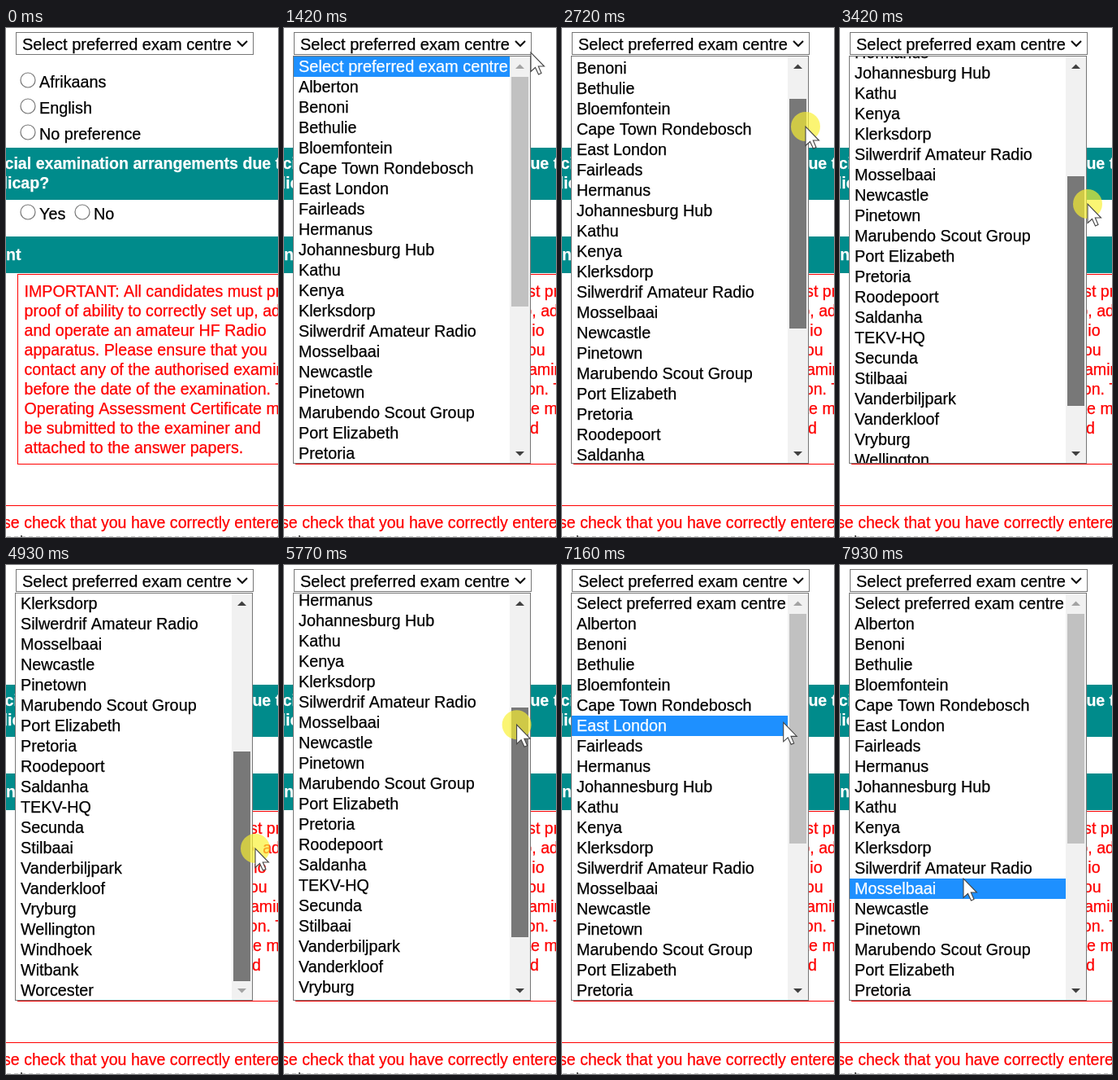
An HTML page with a canvas for the animation above (8000 ms loop, 335 by 625 pixels).

```html
<!DOCTYPE html>
<html lang="en">
<head>
<meta charset="utf-8">
<title>Exam centre list</title>
<style>
  html, body { margin: 0; width: 100%; height: 100%; overflow: hidden; background: #fff; }
  canvas { display: block; width: 335px; height: 625px; }
</style>
</head>
<body>
<canvas id="stage" width="335" height="625"></canvas>
<script>
const ctx = document.getElementById('stage').getContext('2d');
const LOOP = 8000, TICK = 70;
const FACE = '"Liberation Sans", Arial, sans-serif';
const TEAL = '#008b8b', RED = '#f00', GREY = '#767676', BLUE = '#1e90ff';

const options = [
  'Select preferred exam centre', 'Alberton', 'Benoni', 'Bethulie', 'Bloemfontein',
  'Cape Town Rondebosch', 'East London', 'Fairleads', 'Hermanus', 'Johannesburg Hub',
  'Kathu', 'Kenya', 'Klerksdorp', 'Silwerdrif Amateur Radio', 'Mosselbaai', 'Newcastle',
  'Pinetown', 'Marubendo Scout Group', 'Port Elizabeth', 'Pretoria', 'Roodepoort',
  'Saldanha', 'TEKV-HQ', 'Secunda', 'Stilbaai', 'Vanderbiljpark', 'Vanderkloof',
  'Vryburg', 'Wellington', 'Windhoek', 'Witbank', 'Worcester'
];

const notice = [
  'IMPORTANT: All candidates must provide',
  'proof of ability to correctly set up, adjust',
  'and operate an amateur HF Radio',
  'apparatus. Please ensure that you',
  'contact any of the authorised examiners',
  'before the date of the examination. The',
  'Operating Assessment Certificate must',
  'be submitted to the examiner and',
  'attached to the answer papers.'
];

// Popup geometry
const LEFT = 12, TOP = 35, ROW = 25, VIEW = 500, LIST_W = 266;
const MAX_SCROLL = options.length * ROW - VIEW;
const TRACK_TOP = 60, TRACK_LEN = 451;
const THUMB_LEN = Math.round(TRACK_LEN * VIEW / (options.length * ROW));
const TRAVEL = TRACK_LEN - THUMB_LEN;

// Where the pointer turns or pauses
const ENTER = 860, CLICK = 1140, OPEN = 1210, GRAB = 2100, TURN = 4930, RELEASE = 6610;
const pointerKeys = [
  { t: ENTER, x: 309, y: -8 },
  { t: 1420, x: 304, y: 30 },
  { t: 1700, x: 297, y: 94 },
  { t: 2300, x: 297, y: 94 },
  { t: 2720, x: 300, y: 121 },
  { t: 3420, x: 305, y: 216 },
  { t: 4470, x: 307, y: 348 },
  { t: TURN, x: 307, y: 348 },
  { t: 6330, x: 273, y: 95 },
  { t: 6540, x: 270, y: 80 },
  { t: 7370, x: 274, y: 248 },
  { t: 7930, x: 152, y: 385 }
];

const clamp = (v, lo, hi) => Math.min(hi, Math.max(lo, v));

// The pointer advances in short ticks counted from each key.
function pointerAt(time) {
  const i = pointerKeys.findLastIndex(k => k.t <= time);
  const a = pointerKeys[Math.max(i, 0)], b = pointerKeys[i + 1];
  if (i < 0 || !b) return a;
  const elapsed = Math.floor((time - a.t) / TICK + 1e-6) * TICK;
  const k = elapsed / (b.t - a.t);
  return { x: a.x + (b.x - a.x) * k, y: a.y + (b.y - a.y) * k };
}

// The thumb follows the pointer; it is held higher on the way back.
function thumbAt(time, y) {
  if (time < GRAB || time >= RELEASE) return TRACK_TOP;
  const grip = time < TURN ? 34 : 21;
  return clamp(Math.round(y - grip), TRACK_TOP, TRACK_TOP + TRAVEL);
}

function rect(x, y, w, h, color) {
  ctx.fillStyle = color;
  ctx.fillRect(x, y, w, h);
}

function frame(x, y, w, h, color) {
  ctx.strokeStyle = color;
  ctx.lineWidth = 1;
  ctx.strokeRect(x + 0.5, y + 0.5, w - 1, h - 1);
}

function text(str, x, y, color = '#000', size = 19.8, weight = '') {
  ctx.font = `${weight} ${size}px ${FACE}`;
  ctx.fillStyle = ctx.strokeStyle = color;
  ctx.lineWidth = 0.25;
  ctx.fillText(str, x, y);
  ctx.strokeText(str, x, y);
}

function shape(points, x, y) {
  ctx.beginPath();
  points.forEach(([px, py]) => ctx.lineTo(x + px, y + py));
  ctx.closePath();
}

function radio(x, y, label) {
  ctx.beginPath();
  ctx.arc(x, y, 9, 0, Math.PI * 2);
  ctx.strokeStyle = GREY;
  ctx.lineWidth = 1.2;
  ctx.stroke();
  text(label, x + 14, y + 9);
}

function drawPage() {
  rect(0, 0, 335, 625, '#fff');

  ['Afrikaans', 'English', 'No preference'].forEach((s, i) => radio(27, 64 + i * 32, s));
  radio(27, 226, 'Yes');
  radio(94, 226, 'No');

  rect(0, 147, 335, 64, TEAL);
  rect(0, 256, 335, 45, TEAL);
  text('cial examination arrangements due to', -1.5, 173, '#fff', 19.6, 'bold');
  text('dicap?', -10, 197, '#fff', 19.6, 'bold');
  text('nt', 0, 285, '#fff', 19.6, 'bold');

  frame(14, 302, 400, 234, RED);
  notice.forEach((line, i) => text(line, 22.5, 330 + i * 24, RED, 19.65));

  rect(0, 586, 335, 1, RED);
  text('se check that you have correctly entered', -4, 614, RED, 19.6);
  for (let x = 1; x < 335; x += 9) rect(x, 624, 5, 1, '#c8c8c8');
  rect(18, 623, 2, 2, '#555');
}

function drawSelect() {
  frame(12, 5, 293, 28, GREY);
  text(options[0], 20, 27, '#000', 20);
  ctx.beginPath();
  ctx.moveTo(285, 16);
  ctx.lineTo(291, 22);
  ctx.lineTo(297, 16);
  ctx.strokeStyle = '#111';
  ctx.lineWidth = 2.2;
  ctx.stroke();
}

function drawArrow(y, dir, active) {
  shape([[-5.5, 2.5 * dir], [5.5, 2.5 * dir], [0, -3 * dir]], 290.5, y);
  ctx.fillStyle = active ? '#404040' : '#a3a3a3';
  ctx.fill();
}

function drawPopup(thumb, hover, dragging) {
  const scroll = Math.round((thumb - TRACK_TOP) / TRAVEL * MAX_SCROLL);
  rect(11, 34, 293, 501, '#fff');

  ctx.save();
  ctx.beginPath();
  ctx.rect(LEFT, TOP, LIST_W, VIEW - 1);
  ctx.clip();
  options.forEach((name, i) => {
    const y = TOP + i * ROW - scroll;
    const lit = i === hover;
    if (lit) rect(LEFT, y, LIST_W, ROW, BLUE);
    text(name, 18, y + 19, lit ? '#fff' : '#000', i ? 19.8 : 20);
  });
  ctx.restore();

  rect(LEFT + LIST_W, TOP, 25, VIEW, '#f1f1f1');
  rect(280, thumb, 21, THUMB_LEN, dragging ? '#787878' : '#c1c1c1');
  drawArrow(47.5, 1, scroll > 0);
  drawArrow(522.5, -1, scroll < MAX_SCROLL);
  frame(11, 34, 293, 501, GREY);
}

function drawPointer({ x, y }, pressed) {
  if (pressed) {
    ctx.beginPath();
    ctx.arc(x, y, 18, 0, Math.PI * 2);
    ctx.fillStyle = 'rgba(250, 240, 50, 0.68)';
    ctx.fill();
  }
  shape([[0, 0], [0, 23.5], [5.5, 18.5], [9.5, 27], [13, 25.5], [9.3, 17], [16.5, 17]], x, y);
  ctx.fillStyle = '#fff';
  ctx.fill();
  ctx.strokeStyle = '#444';
  ctx.lineWidth = 1.1;
  ctx.stroke();
}

function draw(time) {
  const pointer = pointerAt(time);
  const dragging = time >= GRAB && time < RELEASE;
  const clicking = time >= CLICK && time < CLICK + 2 * TICK;
  const hover = time < RELEASE ? 0 : Math.floor((pointer.y - TOP) / ROW);

  drawPage();
  drawSelect();
  if (time >= OPEN) drawPopup(thumbAt(time, pointer.y), hover, dragging);
  if (time >= ENTER) drawPointer(pointer, dragging || clicking);
}

const begin = performance.now();
function tick() {
  draw((performance.now() - begin) % LOOP);
  requestAnimationFrame(tick);
}
tick();
</script>
</body>
</html>
```
